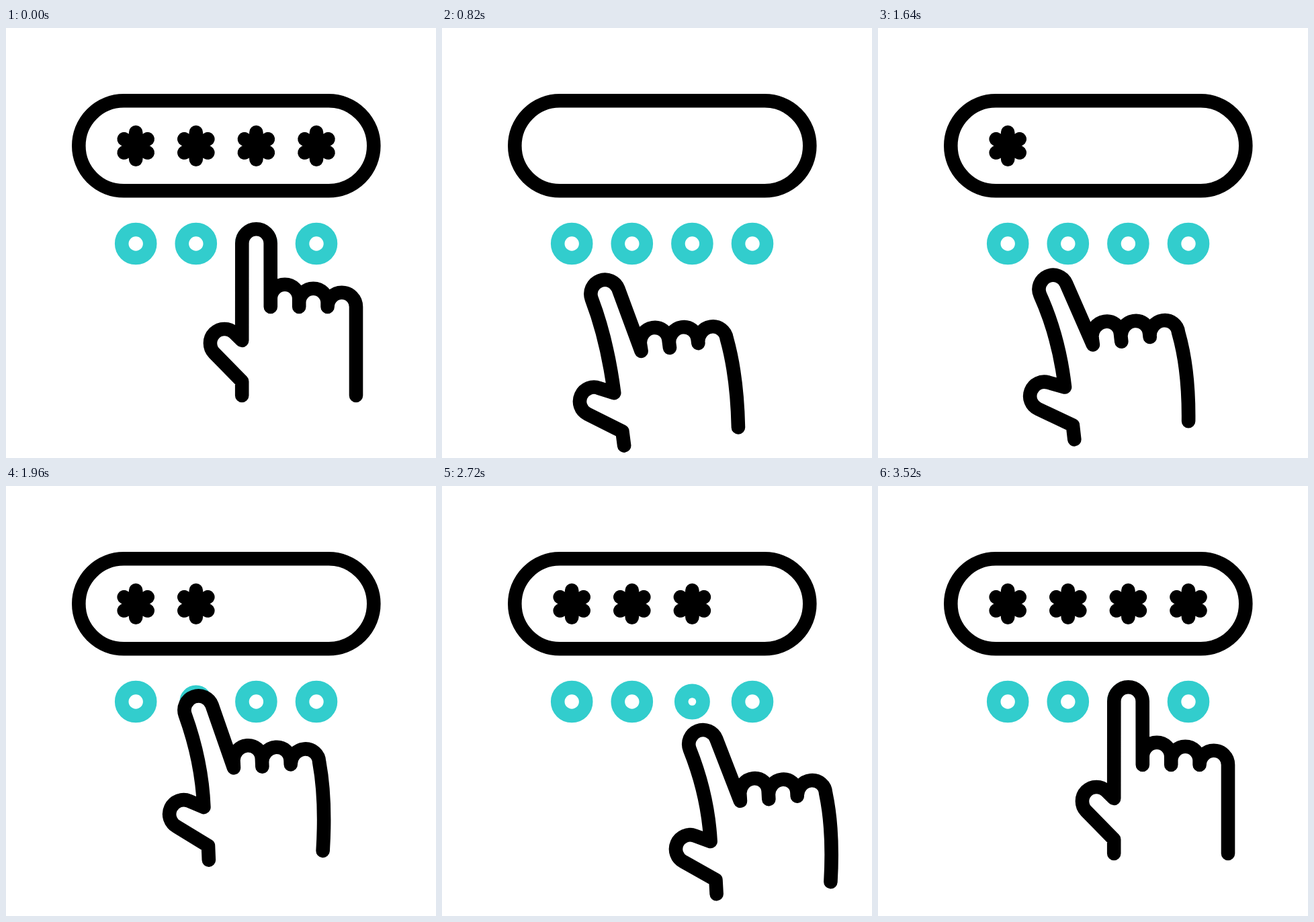
These frames come from a looping animation (640 by 640 pixels, 3.6 s). An HTML page:

```html
<!DOCTYPE html>
<html lang="en">
<head>
<meta charset="utf-8">
<title>Password entry</title>
<style>
  html, body { margin: 0; width: 100%; height: 100%; overflow: hidden; background: #fff; }
  svg { display: block; width: 100%; height: 100%; }
  svg * { stroke-width: 20.6; stroke-linecap: round; stroke-linejoin: round; }
</style>
</head>
<body>
<svg viewBox="0 0 640 640">
  <rect x="108.3" y="108.3" width="439" height="134" rx="67" fill="none" stroke="#000"/>
  <g id="stars" stroke="#000"></g>
  <g id="dots" fill="none" stroke="#32cdcd"></g>
  <path id="hand" fill="#fff" stroke="#000"/>
</svg>
<script>
const LOOP = 3600;
const COLS = [193.2, 282.8, 372.4, 462];
const PRESS = [1110, 1870, 2545, 3080];   // each button goes down
const SHOWN = [1100, 1860, 2535, 3070];   // each star starts to appear
const CLEARED = [570, 420, 270, 120];     // each star starts to vanish

// Hand pose: time, palm x, palm y, sideways lean, tilt, finger bend
const press = (t, x) => [t, x, -6, .026, .065, .86];
const flat = (t, x, y) => [t, x, y, 0, 0, 0];
const POSES = [
  flat(0, 0, 0),
  flat(80, 0, 0),
  [270, 26, 22, .09, .1, .75],
  [560, -33, 47, .121, .147, .83],
  [820, -97, 61, .13, .16, .95],
  press(1110, -149),
  press(1140, -149),
  [1540, -96, 66, .14, .19, 1.18],
  [1640, -74, 52, .114, .16, 1.1],
  press(1850, -59.5),
  press(1880, -59.5),
  [2250, -4, 65.5, .152, .194, 1.2],
  [2300, 4, 65, .152, .194, 1.2],
  press(2530, 30),
  press(2560, 30),
  [2720, 50, 51, .055, .106, .99],
  [2820, 66, 67, .09, .13, 1],
  flat(3080, 89.6, 0),
  flat(3100, 89.6, 0),
  flat(3240, 69, 24),
  flat(3290, 50, 26),
  flat(3520, 0, 0),
  flat(LOOP, 0, 0)
];

const NS = 'http://www.w3.org/2000/svg';
const byId = id => document.getElementById(id);
const clamp = v => Math.min(1, Math.max(0, v));
const smooth = v => (v = clamp(v), v * v * (3 - 2 * v));

function add(parent, name, attrs) {
  const el = document.createElementNS(NS, name);
  for (const k in attrs) el.setAttribute(k, attrs[k]);
  return parent.appendChild(el);
}

const stars = COLS.map(x => {
  let d = '';
  for (let i = 0; i < 6; i++) {
    const a = i * Math.PI / 3;
    d += `M${x} 175.4L${x + 20.2 * Math.sin(a)} ${175.4 - 20.2 * Math.cos(a)}`;
  }
  return add(byId('stars'), 'path', { d });
});
const dots = COLS.map(cx => add(byId('dots'), 'circle', { cx, cy: 321, r: 21 }));

// Monotone cubic interpolation of one pose channel
function slope(i, c) {
  if (i < 1 || i > POSES.length - 2) return 0;
  const rate = j => (POSES[j + 1][c] - POSES[j][c]) / (POSES[j + 1][0] - POSES[j][0]);
  const p = rate(i - 1), q = rate(i);
  return p * q <= 0 ? 0 : 2 * p * q / (p + q);
}

function channel(t, c) {
  let i = 0;
  while (i < POSES.length - 2 && POSES[i + 1][0] <= t) i++;
  const [p, q] = [POSES[i], POSES[i + 1]];
  const h = q[0] - p[0], u = (t - p[0]) / h, e = smooth(u);
  return p[c] * (1 - e) + q[c] * e
    + h * u * (1 - u) * (slope(i, c) * (1 - u) - slope(i + 1, c) * u);
}

function handPath(t) {
  const [px, py, lean, tilt, bend] = [1, 2, 3, 4, 5].map(c => channel(t, c));
  const rad = deg => deg * Math.PI / 180;
  // Place a point of the upright hand; kx, ky shift it with the bend
  const at = (x, y, kx = 0, ky = 0) => [
    x + px + lean * (y - 415) + kx * bend,
    y + py - tilt * (x - 436) + ky * bend
  ];
  const str = p => p[0].toFixed(2) + ' ' + p[1].toFixed(2);
  const line = p => 'L' + str(p);
  const curve = (...p) => 'C' + p.map(str).join(' ');
  const arc = (r, sweep, p) => `A${r} ${r} 0 0 ${sweep} ${str(p)}`;
  const off = (p, len, deg) => [p[0] + len * Math.cos(rad(deg)), p[1] + len * Math.sin(rad(deg))];

  // Half circle over a knuckle, centred on (x, y)
  const knuckle = (x, y) => {
    const r = 21.2, k = r * .5523;
    return line(at(x - r, y))
      + curve(at(x - r, y - k), at(x - k, y - r), at(x, y - r))
      + curve(at(x + k, y - r), at(x + r, y - k), at(x + r, y));
  };

  const thumb = at(325, 469, -9, 8.5);
  const web = at(351.2, 465, -4.5, 3.8);
  const tip = at(393.8, 415);
  tip[0] += -21.3 - 34.5 * bend;
  tip[1] += -94.5 + 8.2 * bend * bend;
  const turn = 22 * bend;
  const left = off(tip, 21.2, 180 - turn);
  const right = off(tip, 21.2, -turn);

  return 'M' + str(at(351.2, 547))
    + line(at(351.2, 526))
    + line(off(thumb, 21.2, 135 - 18 * bend))
    + arc(21.2, 1, off(thumb, 21.2, -45 - 25 * bend))
    + line(web)
    + curve([web[0] - 48 * lean, web[1] - 48], off(left, 48, 90 - turn), left)
    + arc(21.2, 1, right)
    + line(at(393.8, 415, 0, -2))
    + knuckle(415, 403)
    + line(at(436.2, 415))
    + knuckle(457.4, 409)
    + line(at(478.6, 415))
    + knuckle(499.8, 415)
    + curve(at(521, 459, 7), at(521, 503, 5), at(521, 547));
}

function draw(t) {
  stars.forEach((el, i) => {
    const opacity = t < SHOWN[i]
      ? 1 - clamp((t - CLEARED[i]) / 100)
      : clamp((t - SHOWN[i]) / 100);
    el.setAttribute('opacity', opacity);
  });
  dots.forEach((el, i) => {
    const dt = t - PRESS[i];
    el.setAttribute('r', 21 - 7 * (smooth(dt / 100) - smooth((dt - 100) / 205)));
  });
  byId('hand').setAttribute('d', handPath(t));
}

const start = performance.now();
function tick() {
  draw((performance.now() - start) % LOOP);
  requestAnimationFrame(tick);
}
draw(0);
requestAnimationFrame(tick);
</script>
</body>
</html>
```
